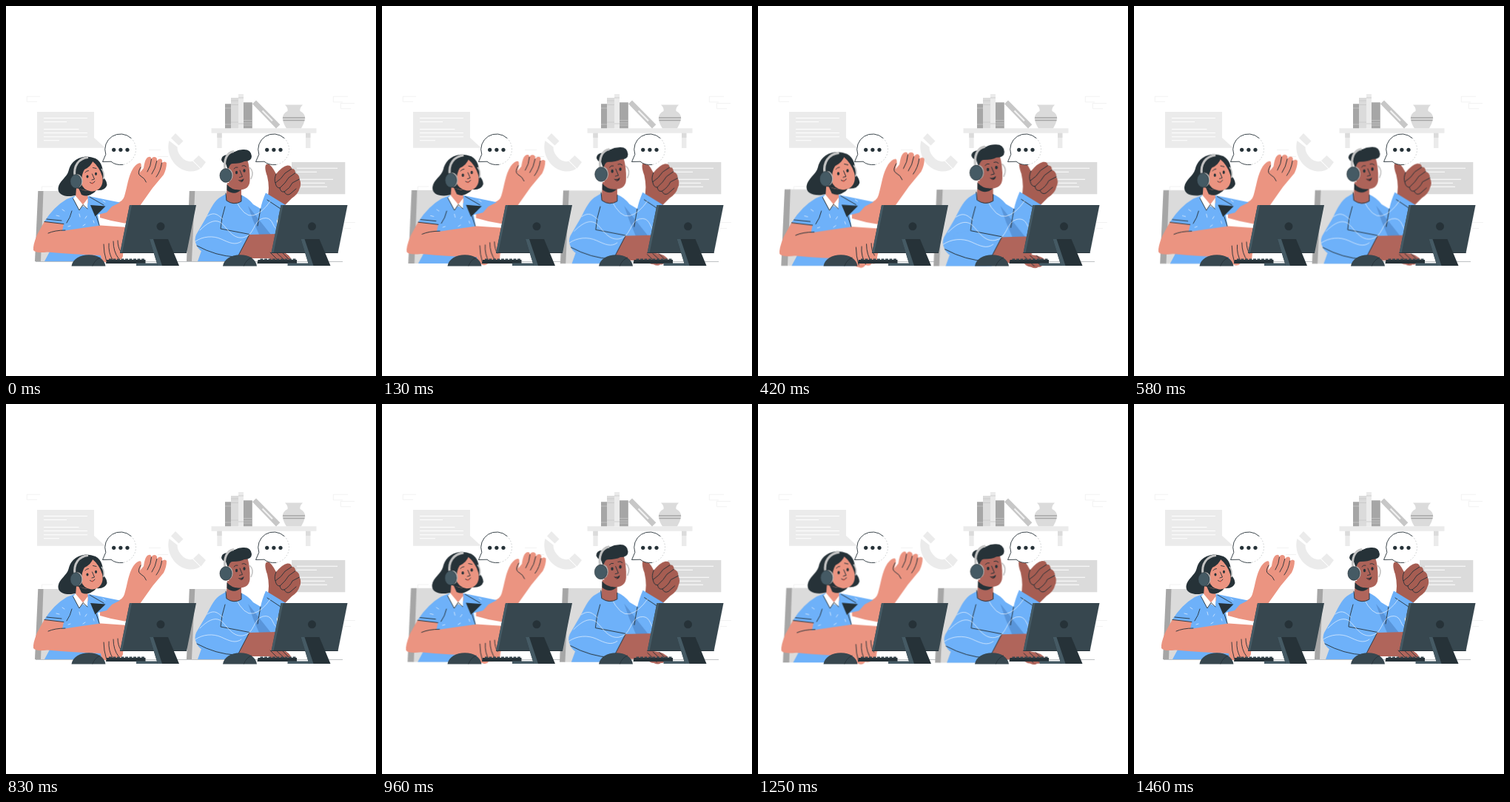
Recreate the animation shown at these times as an HTML page. Size 500x500 px, loop 1500 ms.

```html
<!DOCTYPE html>
<html lang="en">
<head>
<meta charset="utf-8">
<title>Support desk</title>
<style>
html, body { margin: 0; width: 100%; height: 100%; overflow: hidden; background: #fff; }
svg { display: block; width: 100vw; height: 100vh; }
.ink { fill: #263238; }
.line { fill: none; stroke: #263238; stroke-width: .9; stroke-linecap: round; stroke-linejoin: round; }
.thin { fill: none; stroke: #fff; stroke-width: .6; stroke-linecap: round; }
.rule { fill: none; stroke: #fff; stroke-width: 1.1; }
.shirt { fill: #6eb1f9; }
.peach { fill: #eb9481; }
.brown { fill: #a65d52; }
.tan { fill: #b0655b; }
.faint { fill: none; stroke: #ededed; stroke-width: .7; }
.band { fill: none; stroke: #c4c4c4; stroke-width: 3; }
.g1 { fill: #ebebeb; } .g2 { fill: #dbdbdb; } .g3 { fill: #a6a6a6; }
#woman { transform-origin: 127px 275px; }
#man { transform-origin: 321px 271px; }
</style>
</head>
<body>
<svg viewBox="0 0 500 500">
<defs>
  <g id="bubble">
    <path d="M142 210.5L130.5 210.5L135 201A21 21 0 1 1 142 210.5Z" fill="#fff"/>
    <path class="line" d="M158 214.4Q148 215.5 142 210.2L130.5 210.5L134.8 200.5A21 21 0 0 1 169 178.5"/>
    <path class="line" d="M169 178.5A21 21 0 0 1 158 214.4" stroke-dasharray="1 3" opacity=".25"/>
    <g class="ink"><circle cx="145.7" cy="194.3" r="2.6"/><circle cx="154.9" cy="194.3" r="2.6"/><circle cx="164" cy="194.3" r="2.6"/></g>
  </g>
  <g id="desk">
    <path class="ink" d="M136 343H188.5V348H135Z"/>
    <path d="M139 342.5H188" stroke="#37474f" stroke-width="2" stroke-dasharray="4 1.5"/>
    <path d="M88.5 351.5C90 342 100 336.3 112 336.3S133 342 134.5 351.5Z" fill="#37474f"/>
    <path class="line" d="M127 340Q120 343 117 351"/>
    <path d="M176 347.5H206V351H176Z" fill="#455a64"/>
    <path d="M167 269H257L244 334H154Z" fill="#37474f"/>
    <path d="M167 269H170L157 334H154Z" fill="#455a64"/>
    <path d="M154 333.5H244" stroke="#263238" stroke-width=".8"/>
    <circle class="ink" cx="209" cy="297.8" r="5.5"/>
    <path class="ink" d="M194 315H219L234 351H205Z"/>
    <path d="M194 315H199L211 351H205Z" fill="#455a64"/>
  </g>
</defs>

<!-- background -->
<path class="faint" d="M46 122.3H28.3V129.3H42M462 122.3H442.3V129.8H455M471 131.5H452.3V138.7H466M193 194.5H209M205 203.5H219M63 244H48.5V249M457 292.5H472M457 300.5H466"/>
<path class="g1" d="M42 143H119V178L134 191.7H42Z"/>
<path class="rule" d="M51 151.5H110M51 156.5H82M51 166.5H98.5M51 171.5H110M51 176.8H110M51 181.8H72"/>
<path class="g2" d="M386 211H458.3V254.3H372L386 241Z"/>
<path class="rule" d="M393 219.3H448M393 224.3H420M393 234.3H442M393 239.3H431M393 244.3H434"/>

<path class="g1" d="M277.5 165.3H419.5V171.7H277.5ZM285.3 171H291.7V192H285.3ZM405 171H411.4V192H405Z"/>
<path class="g2" d="M285.3 171.7H291.7V178H285.3ZM405 171.7H411.4V178H405ZM304 124H314V165.3H304Z"/>
<path class="g3" d="M296 132.3H304V165.3H296ZM321 130.3H332.8V165.3H321Z"/>
<path class="g1" d="M314 119H321V165.3H314Z"/>
<path d="M314 124H321M314 159H321M304 128H314M304 133.5H314M304 157H314M296 138H304M296 160H304M321 154.5H332.8M321 158H332.8M321 161H332.8" stroke="#c7c7c7" stroke-width=".8"/>
<path fill="#c7c7c7" d="M333 132.3L338 127.6L370.3 160.3L365 165.5Z"/>
<path d="M346.5 141.5L360 155.3" stroke="#f2f2f2" stroke-width="2"/>
<path class="g2" d="M377 133.5H401Q396.500 138 397.5 142Q404 145 404.3 152Q402.5 160 399 165.3H379Q375 160 373.7 152Q374 145 380.5 142Q381.5 138 377 133.5Z"/>
<path d="M374 151H404M374.5 154.5H403.5" stroke="#a6a6a6" stroke-width="1.4"/>

<path class="g1" d="M220.5 182C215 201 229 222 248 223.5Q257 224 263 219.5L252.5 209.5Q247 212 240 207Q231 199 231.5 190.5Z"/>
<path class="g1" d="M229 172L239.5 182.5L233.5 188.5L223 178.5ZM260.5 202L270 211L263.5 219.5L253 209Z"/>
<path d="M221.5 180L233 190.5M251.5 208.5L263 220" stroke="#fff" stroke-width=".8"/>
<path d="M40 345.5H455" stroke="#263238" stroke-width=".6" opacity=".5"/>

<g id="woman">
  <path class="g2" d="M49 250H100V345H46Z"/>
  <path class="g3" d="M43.3 250H50.5L47 345H39Z"/>
  <!-- raised arm -->
  <path class="peach" d="M127 280L150 266Q158 264 160 257C164 244 165 230 172 219Q178 211 182 212.5Q184 215 181 225L186 219C187 213 188 207 191.5 204.5Q196 202 196.5 207Q198 203 202 204.3Q205 206 203.8 209.5Q207 205 210 207Q212 209 210.5 212Q215 209 217 212Q217 220 213 228L198 246L181 270Q178 294 160 293.5Q143 291 127 286Z"/>
  <path class="line" d="M182 218Q177 226 181 229Q188 233 189.5 238M196.5 207Q196 216 191 224M203.8 209.5Q202 220 197 227M210.5 212Q209 223 203 231"/>
  <!-- torso -->
  <path class="shirt" d="M95 256L82 261Q65 271 52 291L76 296L74 304L52 345H131L126 293L124 282L136 279L143 271L154 265.5L112 257Z"/>
  <path class="ink" d="M114 269L134.5 270.5L120.5 284.5Z"/>
  <path class="line" d="M113 258L132 269M89 277Q87 286 82 293M122 284L127 299M55 288L75 290"/>
  <path class="thin" d="M76 275l3 2M68 283l4 1M99 281l1 4M107 287l2-3M104 297l3-2M118 290l1 3M131 263l3 2M84 298l3-1"/>
  <!-- resting arm -->
  <path class="peach" d="M52 291L78 294.5L76 304Q102 300 128 296.5L164 299V320Q158 329 158 338Q156 344 152 342Q149 346 144 344Q140 349 135 346.500Q129 346 128 337C105 336 80 335 56 332.500Q40 334.500 37 330Q36 324 42 309Z"/>
  <path class="line" d="M57 307Q66 303 80 303M52 291.5L78 294.5M132 322Q132 333 135.5 344M139 321Q138 333 144 343M145 318Q145 332 152 341M151 317Q151 326 155 332"/>
  <!-- head -->
  <path class="ink" d="M107 203.5C93 205 86.500 214 84.500 223C82 232 72 236 70.500 246C70 254 77 257.500 88 257L98 255Q116 258 122 249Q134 250 136.500 242Q136 236 132 232C131 220 130 211 121 206Q114 203 107 203.5Z"/>
  <path class="peach" d="M95 246L110 250L111 266L104 271L94 259Z"/>
  <path class="ink" d="M98 246Q108 252 120 249Q113 260 102 255Z"/>
  <path fill="#fff" d="M94 256.5L104 268.5L110.5 260L110 274L103.5 270L99 276L90.5 260Z"/>
  <path class="line" d="M90.5 260L99 276L104 268.5L110 274" stroke-width=".6"/>
  <path class="peach" d="M103 218Q112 218 117 210Q126 217 130 230C132.500 242 127 250.5 115 250.5Q104 249 101 238Z"/>
  <path class="ink" d="M100 236Q100 220 105 213Q112 207 118 208Q115 217 106 221Q102 227 102 238ZM116 208Q128 211 131 230Q126 217 116 208Z"/>
  <path class="line" d="M107 225Q108.500 222.500 111.500 222.500M117.500 218.500L122 219.500M116.500 227L119.5 234L116 235"/>
  <path class="line" stroke-width="1.2" d="M113.5 238.500Q117 241.500 120 237"/>
  <path d="M115 239.5l3-.8-1 2z" fill="#d9483b"/>
  <g class="ink"><ellipse cx="110" cy="230.5" rx="1.5" ry="2.1"/><ellipse cx="121.5" cy="226.8" rx="1.5" ry="2.1"/></g>
  <path class="band" d="M93 230C91 216 98 206 111 204.5"/>
  <path class="band" d="M129 220Q134 226 131.5 234" style="stroke-width:1.6"/>
  <ellipse cx="96.5" cy="236.5" rx="7" ry="9.3" fill="#b5b5b5"/>
  <ellipse cx="94.3" cy="237" rx="7.5" ry="9.3" fill="#455a64" stroke="#263238" stroke-width=".7"/>
</g>

<g id="man">
  <path class="g2" d="M254 250H310V345H250Z"/>
  <path class="g3" d="M247.8 250H255.3L251 345H244Z"/>
  <!-- thumb up -->
  <path class="brown" d="M353 260Q357 247 353 230C350 222 349 214 353 213.5Q358 213 365 227Q373 217 380 215.5Q386 215 386 220Q391 219.500 391 225.500Q397 228 396.500 234Q400 240 396.500 247Q395 254 386 260L376 270Z"/>
  <path class="line" d="M365 227Q362 234 364 239Q372 234 377 226L386 220M364 239Q365 246 370 246Q378 239 382 232L391 225.500M370 246Q371 252 376 251Q384 246 387 239L396.500 234M376 251Q379 257 384 254L392 247"/>
  <!-- shirt -->
  <path class="shirt" d="M297 254L291 257.500C282 262 277 273 271 285L257 309Q254 316 257 322Q259 328 264 331L259 345H316L322 340L366 310V290L378 269L351 252.5Q346 264 344 274L334 268Q327 259 317 255Z"/>
  <path fill="#5995da" d="M327 270L334 290L342 309H358Z"/>
  <path class="tan" d="M327 309L366 308V331Q380 332 385 341Q383 345 379 342Q379 347 374 346Q371 349 365 346Q360 346 356 341L308 341Z"/>
  <path class="shirt" d="M290 301L329 308.5L312 341Q282 337 262 330L270 305Z"/>
  <path class="line" d="M296 271Q291 286 290 301L329 308.5L312 341M344 274Q342 285 340 297M258 324Q284 338 310 339M353 262L371 274M357 333L369 345M364 332L377 344M372 332L382 342"/>
  <path class="thin" d="M262 303C272 293 281 288 289 292S304 315 320 313S334 290 347 287S360 297 364 300M256 318C266 311 280 310 291 315S310 324 318 318M272 284C282 277 287 283 293 288M310 262Q322 286 334 283T357 264"/>
  <!-- head -->
  <path class="tan" d="M299 239H318V264Q308 271 297.5 262Z"/>
  <path class="line" d="M297 253L298 263Q308 270 318 264V256" stroke-width=".6"/>
  <path class="ink" d="M298.5 241Q306 250 318 248Q309 257 298.5 249Z"/>
  <path fill="#ad6359" d="M300 211L326 207Q330 220 329.5 236Q329 247.5 317 248.5Q304 248 301 238Z"/>
  <path class="ink" d="M300 222Q302 213 306 213Q317 213 322 210Q332 210 332 203Q331 193 320 194Q314 194 309 197Q302 195 299 201Q291 202 291 208Q293 213 297 213Z"/>
  <path class="line" stroke-width="1.3" d="M308 220Q310 217 313 218M319 216Q322 214.5 324.5 217"/>
  <path class="line" d="M316 222L319.5 230.5L315.5 231.5"/>
  <g class="ink"><ellipse cx="311.5" cy="225" rx="1.6" ry="2.2"/><ellipse cx="322" cy="222.5" rx="1.6" ry="2.2"/></g>
  <path class="ink" d="M313.5 235Q318 236.5 321.5 233Q321 238 317 238Z"/>
  <path d="M315 236.7q2.5 .4 4-1l-2 2z" fill="#d9483b"/>
  <path class="band" d="M296 222C294 208 298 198 308 196.5"/>
  <path class="band" d="M329 218Q336 224 331 234" style="stroke-width:1.6"/>
  <ellipse cx="299.5" cy="228.5" rx="7" ry="9.3" fill="#b5b5b5"/>
  <ellipse cx="297" cy="229" rx="8" ry="9.3" fill="#455a64" stroke="#263238" stroke-width=".7"/>
</g>

<use href="#bubble"/><use href="#bubble" x="207"/>
<use href="#desk"/><use href="#desk" x="204.5"/>
</svg>
<script>
// Both people pulse together: [time in ms, scale]
const LOOP = 1500;
const beats = [[0, 1], [300, 1.1], [820, 1], [1100, 1.1], [1450, 1], [LOOP, 1]];
const frames = beats.map(([t, s]) => ({
  offset: t / LOOP,
  transform: `scale(${s})`,
  easing: 'cubic-bezier(.37, 0, .63, 1)'
}));
for (const id of ['woman', 'man']) {
  const pulse = document.getElementById(id).animate(frames, { duration: LOOP, iterations: Infinity });
  pulse.startTime = 0;
}
</script>
</body>
</html>
```
